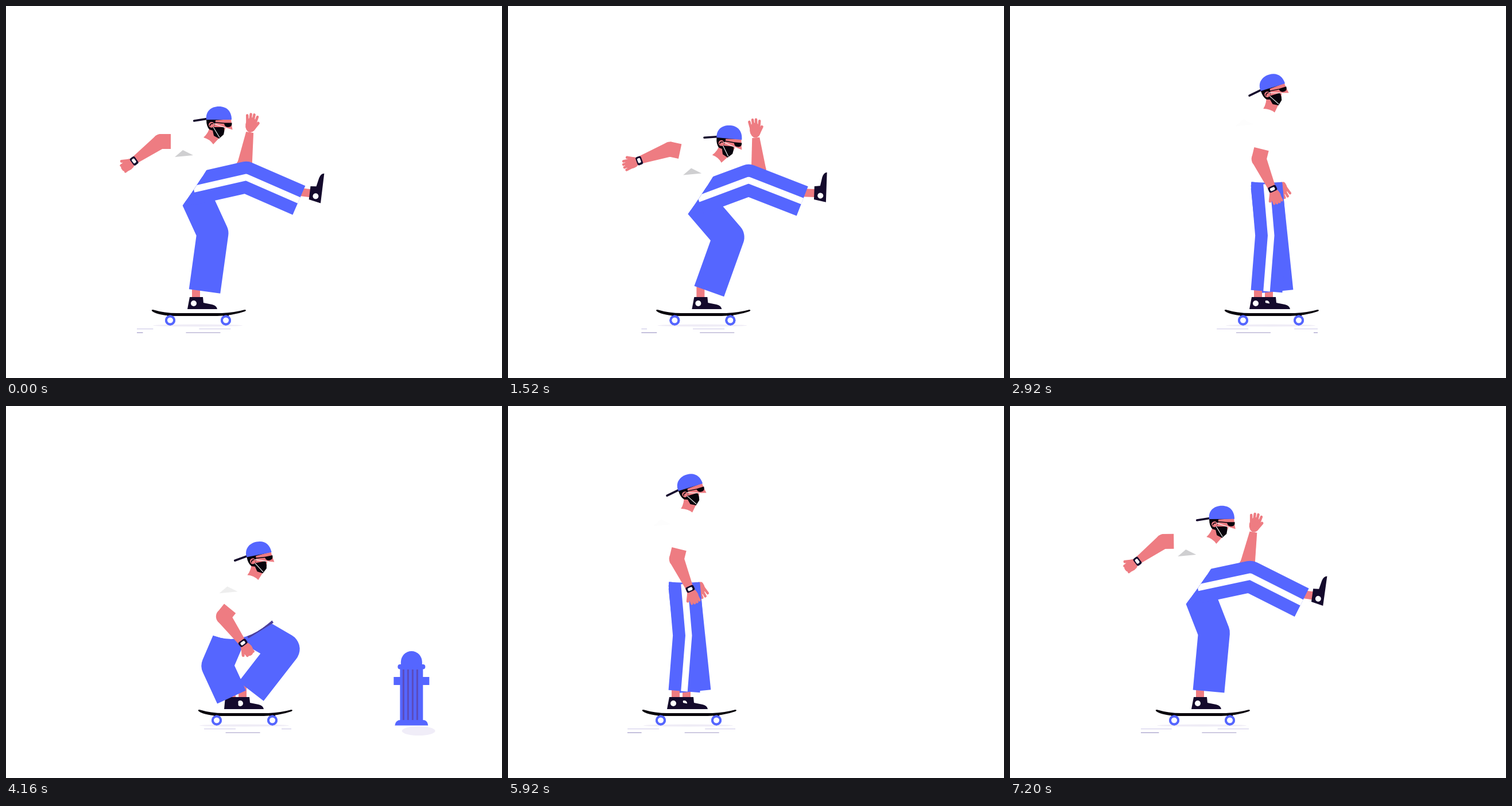
An HTML page with a canvas that plays this animation: 864 by 648 pixels, repeating every 7240 ms.

```html
<!DOCTYPE html>
<html>
<head>
<meta charset="utf-8">
<title>Skater</title>
<style>
html, body { margin: 0; height: 100%; overflow: hidden; background: #fff; }
canvas { display: block; }
</style>
</head>
<body>
<canvas id="stage" width="864" height="648"></canvas>
<script>
const c = document.getElementById('stage').getContext('2d');
const LOOP = 7240, PUSH = 1520, RAD = Math.PI / 180;
const BLUE = '#5566ff', SKIN = '#ee7c82', DARK = '#140a2c', BLACK = '#08040c', WHITE = '#fff';

const clamp = u => Math.max(0, Math.min(1, u));
const ramp = (t, a, b) => { const u = clamp((t - a) / (b - a)); return u * u * (3 - 2 * u); };
const hold = (t, a, b, d, e) => ramp(t, a, b) - ramp(t, d, e);
const polar = ([x, y], angle, r) => [x + r * Math.cos(angle * RAD), y + r * Math.sin(angle * RAD)];
const turn = ([x, y], angle) => {
  const co = Math.cos(angle * RAD), si = Math.sin(angle * RAD);
  return [x * co - y * si, x * si + y * co];
};
const add = ([a, b], [x, y]) => [a + x, b + y];
const mix = (p, q, w) => Object.fromEntries(Object.keys(p).map(k => [k, p[k] + (q[k] - p[k]) * w]));

// Rest poses, x measured from the middle of the board. The near foot kicks,
// the far foot stands; up and fore are arm angles, tuck turns the legs outward.
const stand = {
  headX: 2, headY: 141.5, tilt: -17, hat: 0, hip: 306, waist: 0,
  footX: -24, footY: 507, footA: 0, bend: .3, farX: -5, farY: 507,
  up: 104, fore: 66, farUp: 100, farFore: 64, open: .4, tuck: 0
};
const crouch = {
  ...stand, headX: 24, headY: 259, tilt: -11, hip: 385, waist: -13, bend: -.29,
  up: 129, fore: 54, farUp: 86, farFore: 42, open: .1, tuck: 1
};
const air = {
  ...crouch, headX: 30, headY: 102, tilt: 18, hat: 20, hip: 208, waist: -15,
  footX: -7, footY: 305, footA: -60, farX: 60, farY: 323,
  up: 189, fore: 180, farUp: 10, farFore: -113, open: 1
};

// The pushing foot travels round a flattened loop; the body rocks along.
function push(t) {
  const a = 2 * Math.PI * t / PUSH, co = Math.cos(a), si = Math.sin(a);
  const dip = hold(t, 1100, 1520, 1520, 1900);
  return {
    ...stand, headX: 36 - co + 12 * si + 10 * dip, headY: 182 + 16 * co + 6 * si + 33 * dip,
    tilt: 2 * si + 5 * dip, hip: 310 + 5 * co + 14 * si + 17 * dip, waist: -48 - 8 * co - 8 * si,
    footX: 194 * co - 1, footY: 363 - 37 * co + (150 + 33 * si) * si * si, footA: -8 - 75 * co - 5 * dip,
    bend: 1, up: 127 + 53 * co + 12 * dip, fore: 82 + 62 * co + 16 * dip,
    farUp: 70 - 36 * co - 19 * dip, farFore: 24 - 105 * co - 14 * dip, open: .4 - .25 * co + .5 * dip
  };
}

const hop = t => hold(t, 4280, 4620, 4960, 5320);

function poseAt(t) {
  let p = mix(push(t - (t > LOOP / 2 ? LOOP : 0)), stand, hold(t, 2280, 2740, 6480, 7040));
  p = mix(p, crouch, hold(t, 3400, 4050, 5300, 5720));
  return mix(p, air, hop(t));
}

const rideX = t => 336 + 120 * ramp(t, 1340, 2920) - 39 * ramp(t, 3080, 4160)
  - 8 * ramp(t, 4300, 4960) - 93 * ramp(t, 5250, 5800) + 20 * ramp(t, 6240, 7100);

function at([x, y], angle, draw) {
  c.save();
  c.translate(x, y);
  c.rotate(angle * RAD);
  draw();
  c.restore();
}
function fill(color, d) {
  c.fillStyle = color;
  c.fill(new Path2D(d));
}
function stroke(color, width, d, cap = 'butt') {
  c.strokeStyle = color;
  c.lineWidth = width;
  c.lineCap = cap;
  c.lineJoin = 'round';
  c.stroke(new Path2D(d));
}
function oval(color, x, y, rx, ry = rx) {
  c.fillStyle = color;
  c.beginPath();
  c.ellipse(x, y, rx, ry, 0, 0, 7);
  c.fill();
}
function box(color, x, y, w, h, r = 0) {
  c.fillStyle = color;
  c.beginPath();
  c.roundRect(x, y, w, h, r);
  c.fill();
}

function hydrant(x) {
  at([x, 0], 0, () => {
    oval('#f0edf8', (x - 460) * .05, 566, 29, 8);
    fill(BLUE, 'M-18.5 452V446A18.5 19 0 0 1 18.5 446V452Z');
    box(BLUE, -24, 450, 48, 8.5, 4);
    box(BLUE, -20, 457, 40, 92);
    box(BLUE, -31, 472, 62, 14);
    fill(BLUE, 'M-29 556.5Q-28 547 -19 547H20Q28 547 29 556.5Z');
    for (let i = -14; i <= 10; i += 8) box('#5a4cbc', i - 1.5, 459, 3, 88);
  });
}

// Dashes that run along the ground, seen only below the board.
function dashes(t, x, y, color, laps, front, length) {
  const gap = 135, left = x - 108, right = x + 80;
  const shift = ((front - gap * laps * t / LOOP) % gap + gap) % gap;
  for (let k = -2; k < 2; k++) {
    const a = Math.max(left, x + shift + k * gap);
    const b = Math.min(right, x + shift + k * gap + length);
    if (b > a) stroke(color, 1.2, `M${a} ${y}H${b}`);
  }
}

function board(t, x) {
  const flip = -360 * RAD * clamp((t - 4380) / 780), lift = -153 * hop(t);
  const s = Math.sin(flip), co = Math.cos(flip), turned = Math.abs(s);
  const wheels = draw => {
    for (const w of [-50, 47]) for (const side of [-1, 1]) draw(w, 11.5 * co + side * 5.5 * s + 2 * turned);
  };
  at([x, 536 + lift], hop(t) * (25 * ramp(t, 4400, 4960) - 20), () => {
    if (turned < .12) {
      for (const w of [-50, 47]) box(BLACK, w - 5, Math.min(0, 8 * co), 10, 8);
      fill(BLACK, 'M-80 -7Q-60 -1 -38 -1H40Q62 -2 80 -7Q84 -6 80 -4Q60 3 32 4H-42Q-70 3 -81 -4Q-84 -7 -80 -7Z');
    } else {
      const h = 4 + 21 * turned;
      box(BLACK, -82, -h / 2 - 3 * s, 164, h, h / 2);
      box(s > 0 ? '#e0983c' : BLACK, -83, -h / 2, 166, h, h / 2);
      if (s > 0) {
        for (let w = -60; w <= 60; w += 30)
          stroke(DARK, 1.2, `M${w - 16} ${9 * s}C${w - 8} ${-6 * s} ${w + 10} ${5 * s} ${w + 18} ${-8 * s}`);
        stroke(DARK, 1.2, 'M-78 -3Q-60 -5 -50 2M78 2Q60 4 44 -2');
        for (const w of [-50, 47]) box(BLACK, w - 7, -10 * s, 14, 9 * s);
      }
    }
    wheels((w, y) => oval(BLUE, w, y, 9 - turned));
    wheels((w, y) => oval(WHITE, w, y, 4.8 - 2 * turned));
  });
}

// The knee stays at an equal reach from hip and cuff.
function leg(hip, shoe, angle, swing, reach, bend, split, toe, stripe) {
  const cuff = add(shoe, [15 * swing, -10 * swing]);
  const dx = cuff[0] - hip[0], dy = cuff[1] - hip[1], d = Math.hypot(dx, dy);
  const out = bend * Math.sqrt(Math.max(0, reach * reach - d * d / 4)) / d;
  const knee = [hip[0] + dx * split + dy * out, hip[1] + dy * split - dx * out];
  at(shoe, angle, () => {
    box(SKIN, -7, -26, 14, 28);
    if (toe) {
      fill(DARK, 'M-11 0H12L13 10L28 13Q36 15 37 21H-15Z');
      oval(WHITE, -4, 11, 5);
    } else fill(DARK, 'M-11 0H11L12 21H-13Z');
  });
  const d2 = `M${hip}L${knee}L${cuff}`;
  oval(BLUE, ...hip, 27);
  stroke(BLUE, 55, d2);
  if (stripe > .05) stroke(WHITE, 11.5 * stripe, d2);
}

function arm(shoulder, length, up, fore, open, near) {
  const elbow = polar(shoulder, up, length);
  at(elbow, up + 180, () => box(SKIN, -2, -13, near ? 20 : 15, 26));
  oval(SKIN, ...elbow, 13);
  at(elbow, fore, () => {
    fill(SKIN, 'M0 -13L57 -6.5V6.5L0 13Z');
    c.translate(57, 0);
    oval(SKIN, 13, 0, 13, 9.5);
    for (let i = -1.5; i < 2; i++)
      stroke(SKIN, 4.5, `M12 ${i * 4}L${22 + open * (11 - Math.abs(i) * 3)} ${i * (4 + 2 * open)}`, 'round');
    stroke(SKIN, 5, 'M6 5L18 12', 'round');
    if (near) {
      box(DARK, -5, -8, 10, 15, 3);
      box(WHITE, -2.5, -4.5, 5.5, 8.5, 2);
    }
  });
}

function head(p) {
  at([p.headX, p.headY], p.tilt, () => {
    fill(SKIN, 'M-15 10Q-18 23 -27 31Q-16 34 -10 43L3 29L10 10Z');
    fill(SKIN, 'M-10 -4L21 -2L22 9L23.5 17.5L12 14L6 25L-8 22Z');
    fill(BLACK, 'M-22 1C-23 -14 -12 -20 0 -20C13 -20 21 -12 21 -1L-6 1L-7 8L-9 13L9 13Q10 20 8 26L0 33L-9 28L-11 19L-17 17Q-22 11 -22 1Z');
    oval(SKIN, -13, 9, 5);
    stroke(BLACK, 1.5, 'M-16 11Q-15 6 -10 7');
    fill(BLACK, 'M-8 4L9 5.5H22.5Q23 13 16 13Q10 13 9 7L-8 5.5Z');
    stroke(WHITE, 1.1, 'M-9 7L14 15M-10 13L1 31');
    at([-.3 * p.hat, -.95 * p.hat], -.3 * p.hat, () => {
      stroke(DARK, 3.5, 'M-43.5 2L-18 -2', 'round');
      fill(BLUE, 'M-22 0C-24 -14 -14 -23 0 -23C14 -23 22 -14 22 0Z');
    });
  });
}

function skater(p) {
  const { tuck } = p, neck = [p.headX, p.headY];
  const shoulder = add(neck, turn([-15, 38], p.tilt));
  const waist = [-7, p.hip], half = 32 + 18 * Math.abs(Math.sin(p.waist * RAD)) + 20 * tuck;
  const hemBack = polar(waist, p.waist, -half), hemFront = polar(waist, p.waist, half);
  const hemMid = add(waist, [0, 4 + 34 * tuck]), beyond = polar(waist, p.waist, 700);
  const hem = `${hemBack}Q${hemMid} ${hemFront}`;

  arm(shoulder, 72, p.farUp, p.farFore, 1, false);
  fill(WHITE, `M${hem}L${add(neck, turn([4, 36], p.tilt))}L${add(neck, turn([-28, 30], p.tilt))}Z`);

  // Trousers end at the hem.
  c.save();
  c.clip(new Path2D(`M-900 ${hemBack[1]}L${hem}L${beyond}V900H-900Z`));
  const hipNear = [-9 - 18 * tuck, p.hip + 4 + 12 * tuck], hipFar = [-9 + 26 * tuck, p.hip + 9];
  stroke(BLUE, 28, `M${hipNear}L${hipFar}`);
  leg(hipFar, [p.farX, p.farY], 0, 1, 90.5, 1 - .3 * tuck, .43 - .18 * tuck, true, 0);
  const swing = 1 - tuck + Math.min(0, p.footA) / (37 + 60 * tuck);
  leg(hipNear, [p.footX, p.footY], p.footA, swing, 97, p.bend, .48, tuck < .5, 1 - tuck);
  c.globalAlpha = tuck;
  const inner = [.16, .48, .36].reduce((sum, w, i) => {
    const [x, y] = [hemBack, hemMid, hemFront][i];
    return add(sum, [x * w, y * w]);
  }, [0, 2]);
  stroke('#4d4098', 5, `M${inner}L${add(hemFront, [0, 3])}`);
  c.restore();

  c.globalAlpha = clamp(1 - (180 - p.up) / 80);
  at(shoulder, 0, () => fill('#cfcfd1', 'M-62 27L-48 15L-30 24Z'));
  c.globalAlpha = 1;
  head(p);
  arm(shoulder, 87, p.up, p.fore, p.open, true);
}

function draw(t) {
  const x = rideX(t);
  c.fillStyle = WHITE;
  c.fillRect(0, 0, 864, 648);
  oval('#efecf6', x - 2, 556.5, 78 - 20 * hop(t), 2);
  dashes(t, x, 562.5, '#cdc8e8', 34, -134, 55);
  dashes(t, x, 569, '#9d95c4', 28, -22, 60);
  hydrant(707 - (t - 4160) * .6525);
  board(t, x);
  at([x, 0], 0, () => skater(poseAt(t)));
}

function tick() {
  draw(performance.now() % LOOP);
  requestAnimationFrame(tick);
}
tick();
</script>
</body>
</html>
```
